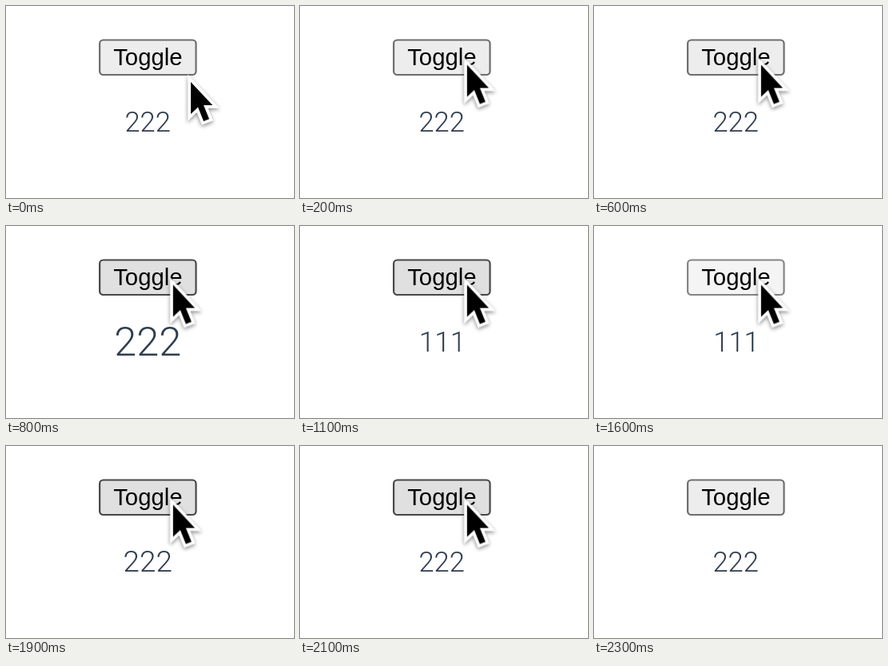
Recreate the animation shown at these times as an HTML page. Size 360 by 240 pixels, loop 2.4 s.

```html
<!DOCTYPE html>
<html lang="en">
<head>
<meta charset="utf-8">
<title>Toggle bounce</title>
<style>
  html, body { margin: 0; width: 100%; height: 100%; overflow: hidden; background: #fff; }
  svg { display: block; width: 360px; height: 240px; }
  text { text-anchor: middle; }

  /* Every animation spans the whole loop; the script sets its time. */
  .button, .bounce, .one, .two, .cursor { animation: 2400ms linear infinite paused; }

  .button { animation-name: press; animation-timing-function: step-end; stroke-width: 2.2; }
  .label { font: 29.3px "Liberation Sans", Arial, sans-serif; }
  .bounce { animation-name: bounce; transform-origin: 177.2px 144.5px; }
  .bounce text { font: 350 34.6px Roboto, sans-serif; fill: #303e50; }
  .one, .two { animation-timing-function: step-end; }
  .one { animation-name: show-one; }
  .two { animation-name: show-two; }
  .cursor { animation-name: point; filter: drop-shadow(0 2px 2.5px rgba(0, 0, 0, .45)); }
  .cursor path { stroke: #fff; stroke-width: 7.5; paint-order: stroke; }

  @keyframes press {
    0%, 91.6%, 100% { fill: #ededed; stroke: #6e6e6e; }
    29.1%, 66.6%    { fill: #f4f4f4; stroke: #858585; }
    33.3%, 70.8%    { fill: #e0e0e0; stroke: #484848; }
  }

  /* Leaving plays the entering bounce backwards, so its easing is mirrored. */
  @keyframes bounce {
    0%, 46.875%, 86.083%, 100% { transform: scale(1); }
    29.375%, 68.583% { transform: scale(1); animation-timing-function: cubic-bezier(.75, 0, .75, .9); }
    33.75%, 72.958%  { transform: scale(1.5); animation-timing-function: cubic-bezier(.75, 0, .75, .9); }
    38.125%, 77.333% { transform: scale(0); animation-timing-function: ease; }
    42.5%, 81.708%   { transform: scale(1.5); animation-timing-function: ease; }
  }

  @keyframes show-one {
    0%, 77.333%, 100% { visibility: hidden; }
    38.125% { visibility: visible; }
  }
  @keyframes show-two {
    0%, 77.333%, 100% { visibility: visible; }
    38.125% { visibility: hidden; }
  }

  @keyframes point {
    0% { transform: translate(231px, 95px); animation-timing-function: ease-out; }
    8.3%, 87.5% { transform: translate(208.8px, 73.5px); }
    95.8%, 100% { transform: translate(216px, 307px); }
  }
</style>
</head>
<body>
<svg viewBox="0 0 360 240">
  <rect class="button" x="117.1" y="42.5" width="120.4" height="43.5" rx="4.5"/>
  <text class="label" x="177.4" y="74">Toggle</text>
  <g class="bounce">
    <text class="one" x="178" y="156.7">111</text>
    <text class="two" x="177.2" y="156.7">222</text>
  </g>
  <g class="cursor">
    <path d="M0 0V40L9 31.5L16 49L23 46.2L16 29H27.2Z"/>
  </g>
</svg>
<script>
  const LOOP = 2400, TICK = 100;
  const animations = document.getAnimations();

  // The picture advances ten times a second.
  function draw() {
    const time = Math.floor(performance.now() % LOOP / TICK) * TICK;
    for (const a of animations) a.currentTime = time;
    requestAnimationFrame(draw);
  }
  draw();
</script>
</body>
</html>
```
